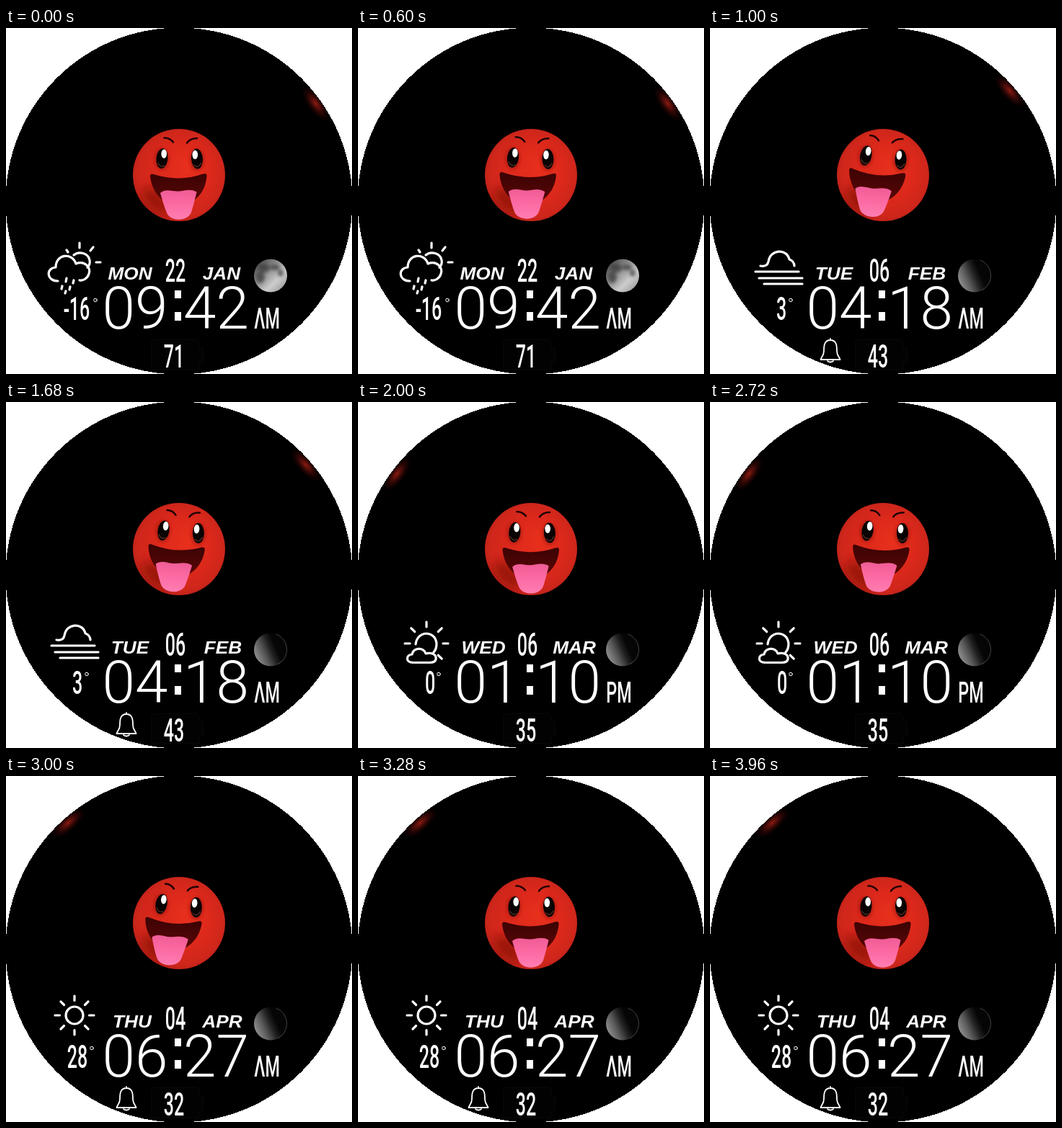
Animation, 480 px wide and 480 px high, one loop 4 s. Source, as an HTML page:

```html
<!DOCTYPE html>
<html lang="en">
<head>
<meta charset="utf-8">
<title>Watch face</title>
<style>
  html, body { margin: 0; width: 100%; height: 100%; overflow: hidden; background: #fff; }
  svg { display: block; width: 100vw; height: 100vh; }
  text { fill: #fff; text-anchor: middle; }
  .slim { font: 500 44px Roboto, sans-serif; }
  .half { font-size: 41px; }
  .date { font: italic bold 23px "Liberation Sans", sans-serif; }
  .time { font: 300 82px Roboto, sans-serif; text-anchor: start; }
  .line { fill: none; stroke: #fff; stroke-linecap: round; stroke-linejoin: round; }
</style>
</head>
<body>
<svg viewBox="0 0 480 480">
  <defs>
    <clipPath id="dial"><circle cx="240" cy="240" r="240"/></clipPath>
    <clipPath id="ballClip"><circle cx="240" cy="204" r="64"/></clipPath>
    <radialGradient id="ball" cx=".5" cy=".5" r=".55" fx=".62" fy=".4">
      <stop offset="0" stop-color="#e9301c"/>
      <stop offset=".5" stop-color="#dd291b"/>
      <stop offset=".85" stop-color="#cf261b"/>
      <stop offset="1" stop-color="#b42018"/>
    </radialGradient>
    <linearGradient id="tongue" x1="0" y1="0" x2="0" y2="1">
      <stop offset="0" stop-color="#ee5c96"/>
      <stop offset=".35" stop-color="#fa669f"/>
      <stop offset="1" stop-color="#ff7db2"/>
    </linearGradient>
    <linearGradient id="mouth" x1="0" y1="0" x2="0" y2="1">
      <stop offset="0" stop-color="#3c0304"/>
      <stop offset="1" stop-color="#5c0606"/>
    </linearGradient>
    <radialGradient id="glint">
      <stop offset="0" stop-color="#8e1a12"/>
      <stop offset=".35" stop-color="#5e100b" stop-opacity=".75"/>
      <stop offset="1" stop-color="#200" stop-opacity="0"/>
    </radialGradient>
    <linearGradient id="full" x1=".1" y1=".1" x2=".85" y2=".85">
      <stop offset="0" stop-color="#4c4c4c"/>
      <stop offset=".4" stop-color="#909090"/>
      <stop offset=".75" stop-color="#cdcdcd"/>
      <stop offset="1" stop-color="#a8a8a8"/>
    </linearGradient>
    <linearGradient id="waning" x1=".05" y1=".7" x2=".95" y2=".3">
      <stop offset="0" stop-color="#8c8c8c"/>
      <stop offset=".25" stop-color="#5c5c5c"/>
      <stop offset=".5" stop-color="#222"/>
      <stop offset=".68" stop-color="#060606"/>
      <stop offset="1" stop-color="#050505"/>
    </linearGradient>
    <filter id="soft" x="-50%" y="-50%" width="200%" height="200%"><feGaussianBlur stdDeviation="2"/></filter>
    <filter id="shade" x="-50%" y="-50%" width="200%" height="200%"><feGaussianBlur stdDeviation="7"/></filter>
  </defs>
  <circle cx="240" cy="240" r="240.500" shape-rendering="crispEdges"/>
  <g id="panel"></g>
  <circle cx="240" cy="204" r="64" fill="url(#ball)"/>
  <g clip-path="url(#ballClip)">
    <ellipse cx="208" cy="240" rx="24" ry="13" fill="#7c0806" opacity=".65" transform="rotate(42 208 240)" filter="url(#shade)"/>
    <g id="jaw">
      <path d="M200 206Q200 201 205 203Q240 214 273 202.500Q279 200.500 278.500 206C277 224 267 238 251 245H227C212 238 202 224 200 206Z" fill="url(#mouth)"/>
    </g>
    <path id="lick" d="M214 229C221 222 232 227 239 226.500C247 226 256 222 264.500 227.500C262 238 260 246 257.500 254C254 269 227 270 222.500 255C219 246 217 239 214 229Z" fill="url(#tongue)"/>
    <g id="eyes">
      <g fill="#7d0d09" opacity=".45" filter="url(#soft)">
        <ellipse cx="216" cy="182" rx="10" ry="15"/><ellipse cx="265" cy="183" rx="10" ry="15"/>
      </g>
      <g fill="#090303">
        <ellipse cx="216.500" cy="181" rx="8" ry="14" transform="rotate(6 216.500 181)"/>
        <ellipse cx="265" cy="181.500" rx="8" ry="14" transform="rotate(-4 265 181.500)"/>
      </g>
      <path d="M210.500 187Q214 194 220 191M261 190Q266 196 271 187" fill="none" stroke="#4a2a20" stroke-width="1.500" stroke-linecap="round"/>
      <ellipse cx="219.200" cy="174.500" rx="3.800" ry="6.200" fill="#fff"/>
      <ellipse cx="262.300" cy="175.800" rx="3.800" ry="6.200" fill="#fff"/>
      <path d="M219.500 152.500Q227 152 232 158.500M251 159.500Q255.500 153 265 153" fill="none" stroke="#200303" stroke-width="2.500" stroke-linecap="round"/>
    </g>
  </g>
</svg>
<script>
const LOOP = 4000, TICK = 40;
const $ = id => document.getElementById(id);

const line = (d, w = 3.2) => `<path class="line" d="${d}" stroke-width="${w}"/>`;
const rays = (x, y, r1, r2, steps) => steps.map(k => {
  const a = k * Math.PI / 4, c = Math.cos(a), s = Math.sin(a);
  return `M${x + r1 * c} ${y + r1 * s}L${x + r2 * c} ${y + r2 * s}`;
}).join('');

const icons = {
  rain: line('M72 351C56 351 55 333 69 332C69 313 92 311 97 327C110 322 118 333 115 341C113 348 106 351 102 350' +
    'M94 315C101 309 114 312 116 322C117 327 115 330 113 332') +
    line('M84 308L86 311M102 298V305M121 304L117 309M125 325H131M84 347L83 352' +
    'M94 350L93 354M78 358L77 362M89 359L88 363M83 365L82 368'),
  fog: line('M70 330C76 331 80 329 81 324C84 306 107 306 110 321C114 322 117 326 117 330M63 338H123M68 347H128M75 355H128'),
  fair: line('M76 361.500C66 361.500 66 351 75 350C77 340 91 340 94 349C104 347 109 351 108 357C107 361 104 361.500 100 361.500Z' +
    'M80 336C82 317 107 316 109 335C109 342 107 345 105 347' + rays(95, 335, 23, 30, [0, 1, 4, 5, 6, 7])),
  sun: line('M83 332a12 12 0 1 0 24 0a12 12 0 1 0 -24 0' + rays(95, 332, 20.5, 27, [0, 1, 2, 3, 4, 5, 6, 7]))
};

const bell = line('M167 433C158 433 158 442 158 448C158 455 154 457 153.500 460H180.500' +
  'C180 457 176 455 176 448C176 442 176 433 167 433V431M163 462Q167 465 171 462', 1.8);

// day, x, day number, month, x, hour, minute, half, degrees, x, degree sign x, charge, icon, glint angle
const screens = [
  ['MON', 172, '22', 'JAN', 299, '09', '42', 'ΛM', '-16', 98, 124, '71', 'rain', -35.5],
  ['TUE', 172, '06', 'FEB', 301, '04', '18', 'ΛM', '3', 99, 112, '43', 'fog', -41],
  ['WED', 174, '06', 'MAR', 300, '01', '10', 'PM', '0', 100, 112, '35', 'fair', 217],
  ['THU', 175, '04', 'APR', 300, '06', '27', 'ΛM', '28', 99, 119, '32', 'sun', 228.7]
];

const text = (cls, s, x, y, wide = 1) =>
  `<text class="${cls}" transform="translate(${x} ${y}) scale(${wide} 1)">${s}</text>`;
const slim = (s, x, y, cls = '') => text('slim ' + cls, s, x, y, .57);
const date = (s, x) => text('date', s, x, 348.5, 1.14);

function moon(full) {
  const disc = `<circle cx="367" cy="343.500" r="23" fill="url(#${full ? 'full' : 'waning'})"/>`;
  if (!full) return disc + `<g opacity=".35">${line('M375 322A23 23 0 0 1 377 364', .7)}</g>`;
  return disc + `<g fill="#303030" opacity=".65" filter="url(#soft)"><ellipse cx="358" cy="333" rx="8" ry="6"/>
    <ellipse cx="373" cy="332" rx="7" ry="4"/><ellipse cx="353" cy="346" rx="6" ry="8"/><ellipse cx="381" cy="340" rx="4" ry="5"/></g>`;
}

function panel(i) {
  const [day, dayX, num, month, monthX, hour, minute, half, deg, degX, signX, charge, icon, angle] = screens[i];
  return `<g clip-path="url(#dial)"><ellipse rx="12" ry="30" fill="url(#glint)"
      transform="rotate(${angle} 240 240) translate(473 240)"/></g>` +
    icons[icon] + moon(i === 0) + (i % 2 ? bell : '') +
    date(day, dayX) + date(month, monthX) + slim(num, 235, 352) +
    text('time', hour, 133.5, 416.5) + text('time', minute, 246, 416.5) +
    '<path d="M234 364h9v11h-9zM234 394h9v12h-9z" fill="#fff"/>' +
    slim(half, 362, 417, 'half') + slim(deg, degX, 405) +
    `<circle class="line" cx="${signX}" cy="377.500" r="2.300" stroke-width="1"/>` +
    '<path d="M207 432H262Q268 432 268 438V444H273V463H268V474H202V437Q202 432 207 432Z" fill="#020202" stroke="#0b0b0b"/>' +
    slim(charge, 233, 471);
}

// time and number of head swings done by then
const swings = [[0, 0], [160, 0], [1000, 1.56], [1680, 2.3], [2280, 3.75], [2720, 4.27], [3280, 5], [3960, 6], [4000, 6]];

function swingAt(t) {
  const i = swings.findIndex(k => k[0] > t);
  const [t0, p0] = swings[i - 1], [t1, p1] = swings[i];
  return p0 + (p1 - p0) * (t - t0) / (t1 - t0);
}

let shown = -1;
function draw(ms) {
  const t = Math.floor(ms % LOOP / TICK) * TICK;
  const i = Math.floor(t / 1000);
  if (i !== shown) $('panel').innerHTML = panel(shown = i);

  const a = swingAt(t) * 2 * Math.PI;
  const lift = 1 - Math.cos(a);
  const tilt = 3 * lift, side = 1.8 * Math.sin(a) - lift;
  // lower features lag further to the left
  const pose = (id, lag, up) => $(id).setAttribute('transform',
    `translate(${side - lag * tilt} ${-up * tilt}) rotate(${tilt} 240 204)`);
  pose('eyes', 0, .3);
  pose('jaw', .75, .75);
  pose('lick', 1.3, .6);
}

const start = performance.now();
function loop() {
  draw(performance.now() - start);
  requestAnimationFrame(loop);
}
loop();
</script>
</body>
</html>
```
